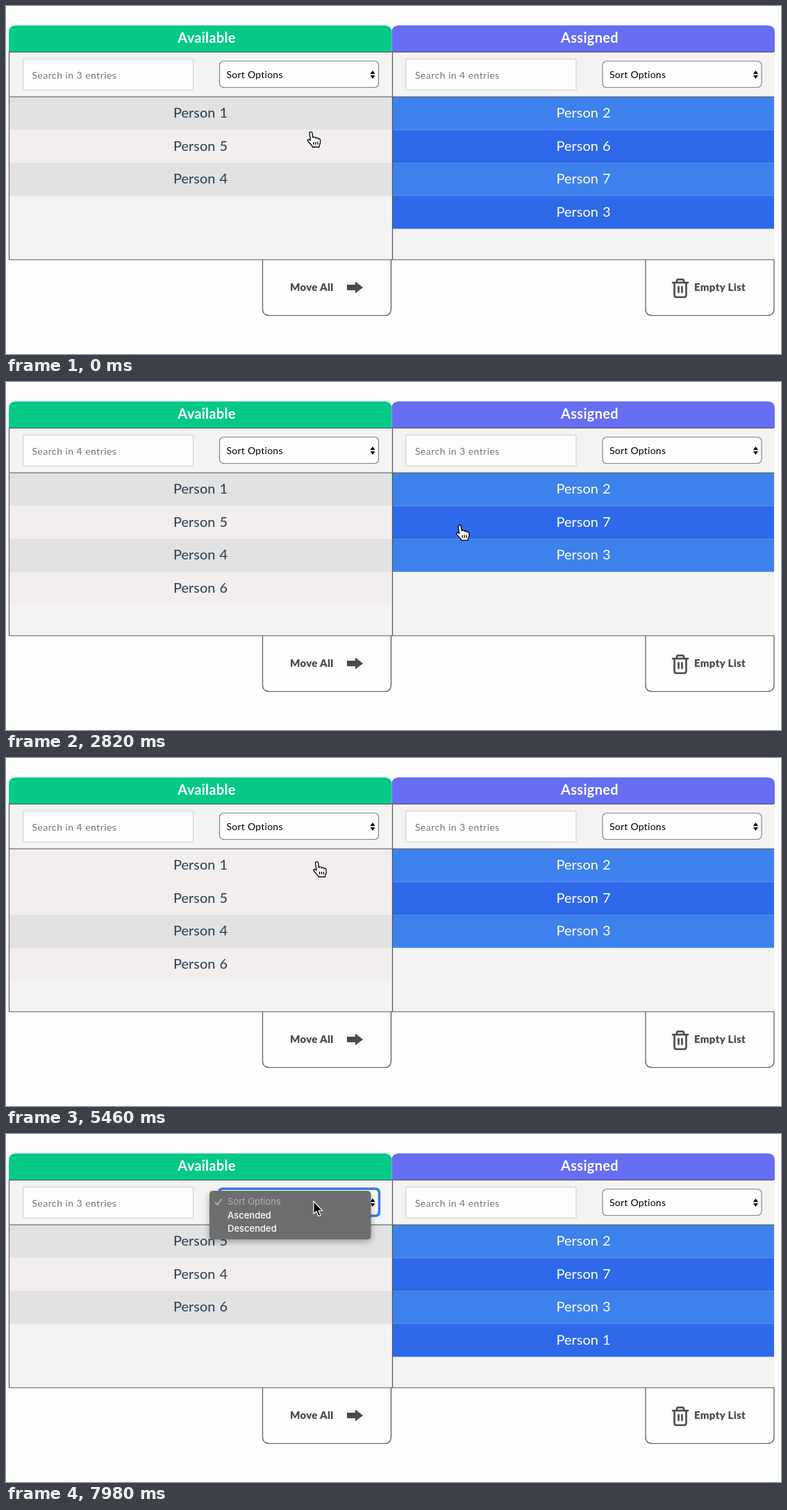
Animation, 1116 px wide and 502 px high, one loop 8000 ms. Source, as an HTML page:

```html
<!DOCTYPE html>
<html lang="en">
<head>
<meta charset="utf-8">
<title>Pick list</title>
<style>
html, body { margin: 0; width: 100%; height: 100%; overflow: hidden; background: #fdfdfd; }
svg { display: block; font-family: Lato, "Open Sans", sans-serif; }
.head { font-size: 20px; font-weight: 700; letter-spacing: .3px; fill: #fff; text-anchor: middle; }
.row { font-size: 20px; word-spacing: 1px; }
.search { font-size: 14px; letter-spacing: .45px; fill: #757575; }
.sort { font-size: 14px; letter-spacing: .25px; }
.button { font-size: 15px; font-weight: 900; letter-spacing: .3px; fill: #4a4a4a; }
.line { fill: none; stroke: #555; stroke-width: 1.2; }
#menu { font: 500 13px Inter, Roboto, sans-serif; fill: #fff; }
#menu rect { filter: drop-shadow(0 3px 5px #0005); }
</style>
</head>
<body>
<svg width="1116" height="502" viewBox="0 0 1116 502">
  <g id="panels"></g>
  <g id="rows"></g>
  <path class="line" d="M4 66.5H1106M4 131H1106M4 366H1106M4.5 66V366M556.5 66V366"/>
  <path d="M491 402H503V397.5L514 406L503 414.5V410H491Z" fill="#4a4a4a"/>
  <g fill="none" stroke="#4a4a4a" stroke-width="2.6" stroke-linejoin="round" stroke-linecap="round">
    <path d="M960 399H982M962.5 399V417Q962.5 420 965.5 420H976.5Q979.5 420 979.5 417V399M966 398V396.5Q966 394.5 968 394.5H974Q976 394.5 976 396.5V398M968.5 405V413M973.5 405V413"/>
  </g>
  <text class="button" x="409" y="411">Move All</text>
  <text class="button" x="991" y="411">Empty List</text>
  <g id="menu">
    <rect x="293" y="82" width="232.500" height="70" rx="5" fill="#6c6e70"/>
    <path d="M301 98.500L304.500 102L310.500 93.500" fill="none" stroke="#b0b1b2" stroke-width="1.800"/>
    <text x="319" y="102" fill="#b0b1b2" font-weight="400">Sort Options</text>
    <text x="319" y="122">Ascended</text>
    <text x="319" y="141">Descended</text>
  </g>
  <g id="hand" stroke="#000" stroke-width="1.300" stroke-linejoin="round">
    <path fill="#fff" d="M-2 .5C-2-2 2-2 2 .5L3 7C4 5 7 6 7 8C8 6 10.500 7 10.500 9C11.500 7.500 13.500 8.500 13.500 10.500V14C13.500 17 12 17 12 20.500H2.500C2 18-1.500 15.500-4.500 11.500C-5.500 9.500-3 8.500-.500 11Z"/>
    <path fill="none" d="M4 13V17M7 13V17M10 13V17"/>
  </g>
  <path id="arrow" d="M0 0V18L4 14.500L7 21.500L10 20.200L7.200 13.500H12.500Z" stroke="#fff" stroke-width="1.200"/>
</svg>
<script>
const LOOP = 8000, MOVE_LEFT = 1640, MOVE_RIGHT = 5900, OPEN = 7300;
const HOVER_LAG = 130, OFFSET = 551.5, ROW = 47.6, LIST_TOP = 131;
const $ = id => document.getElementById(id);

const sides = [
  { title: "Available", head: "#06c988", odd: "#e2e2e2", even: "#f1eeed", text: "#2c3e50" },
  { title: "Assigned", head: "#676df3", odd: "#3d81ec", even: "#2e69e9", text: "#fff" }
];

// Pointer stops: time, x, y
const path = [
  [0, 439, 183], [500, 439, 183], [1000, 600, 168], [1120, 618, 187],
  [1500, 664, 209], [2700, 664, 209], [3500, 490, 190], [4300, 490, 190],
  [4900, 447.5, 151], [6600, 447.5, 151], [7200, 443, 97], [LOOP, 443, 97]
];

function pointer(t) {
  const i = Math.max(1, path.findIndex(p => p[0] > t));
  const [t0, x0, y0] = path[i - 1], [t1, x1, y1] = path[i];
  const u = Math.max(0, (t - t0) / (t1 - t0)), e = u * u * (3 - 2 * u);
  return [x0 + (x1 - x0) * e, y0 + (y1 - y0) * e];
}

function lists(t) {
  if (t < MOVE_LEFT) return [[1, 5, 4], [2, 6, 7, 3]];
  if (t < MOVE_RIGHT) return [[1, 5, 4, 6], [2, 7, 3]];
  return [[5, 4, 6], [2, 7, 3, 1]];
}

const panel = (s, i) => `<g transform="translate(${i * OFFSET})">
  <path d="M4 66V38Q4 28 14 28H545.5Q555.5 28 555.5 38V66Z" fill="${s.head}"/>
  <text class="head" x="289" y="52.5">${s.title}</text>
  <rect x="4" y="66" width="551" height="300" fill="#f3f3f2"/>
  <rect x="24.500" y="76.500" width="245" height="44.500" fill="#fdfdfd" stroke="#cccbd2"/>
  <text class="search" x="37.500" y="105"></text>
  <rect class="sel" x="307.500" y="79.500" width="229" height="38" rx="6" fill="#fdfdfd" stroke="#858585" stroke-width="1.200"/>
  <text class="sort" x="317.500" y="104">Sort Options</text>
  <path d="M524.500 98L528 93L531.500 98ZM524.500 100L528 105L531.500 100Z"/>
  <path class="line" d="M369.500 366V436.500Q369.500 446.500 379.500 446.500H544.500Q554.500 446.500 554.500 436.500V366"/>
</g>`;

$("panels").innerHTML = sides.map(panel).join("") +
  `<rect id="focus" x="306.5" y="79" width="231" height="39" rx="5" fill="none" stroke="#3d7de0" stroke-width="3.500"/>`;
const searches = document.querySelectorAll(".search");

function row(n, side, i, hovered) {
  const s = sides[side], y = LIST_TOP + i * ROW, x = side ? 557 : 5;
  const fill = hovered || i % 2 ? s.even : s.odd;
  return `<rect x="${x}" y="${y}" width="${side ? 549 : 551}" height="${ROW}" fill="${fill}"/>
    <text class="row" x="${241 + side * OFFSET}" y="${y + 30}" fill="${s.text}">Person ${n}</text>`;
}

function show(el, on) { el.style.display = on ? "" : "none"; }

function draw() {
  const t = performance.now() % LOOP, [x, y] = pointer(t);
  const [hx, hy] = pointer(Math.max(0, t - HOVER_LAG));
  const hoverSide = hx > 556 ? 1 : 0, hoverRow = Math.floor((hy - LIST_TOP) / ROW);
  const both = lists(t);
  $("rows").innerHTML = both.map((list, side) => list.map((n, i) =>
    row(n, side, i, side === hoverSide && i === hoverRow)).join("")).join("");
  both.forEach((list, i) => searches[i].textContent = `Search in ${list.length} entries`);

  const overList = y > LIST_TOP;
  show($("hand"), overList);
  show($("arrow"), !overList);
  $(overList ? "hand" : "arrow").setAttribute("transform", `translate(${x} ${y})`);
  show($("menu"), t >= OPEN);
  show($("focus"), t >= OPEN);
  requestAnimationFrame(draw);
}
draw();
</script>
</body>
</html>
```
